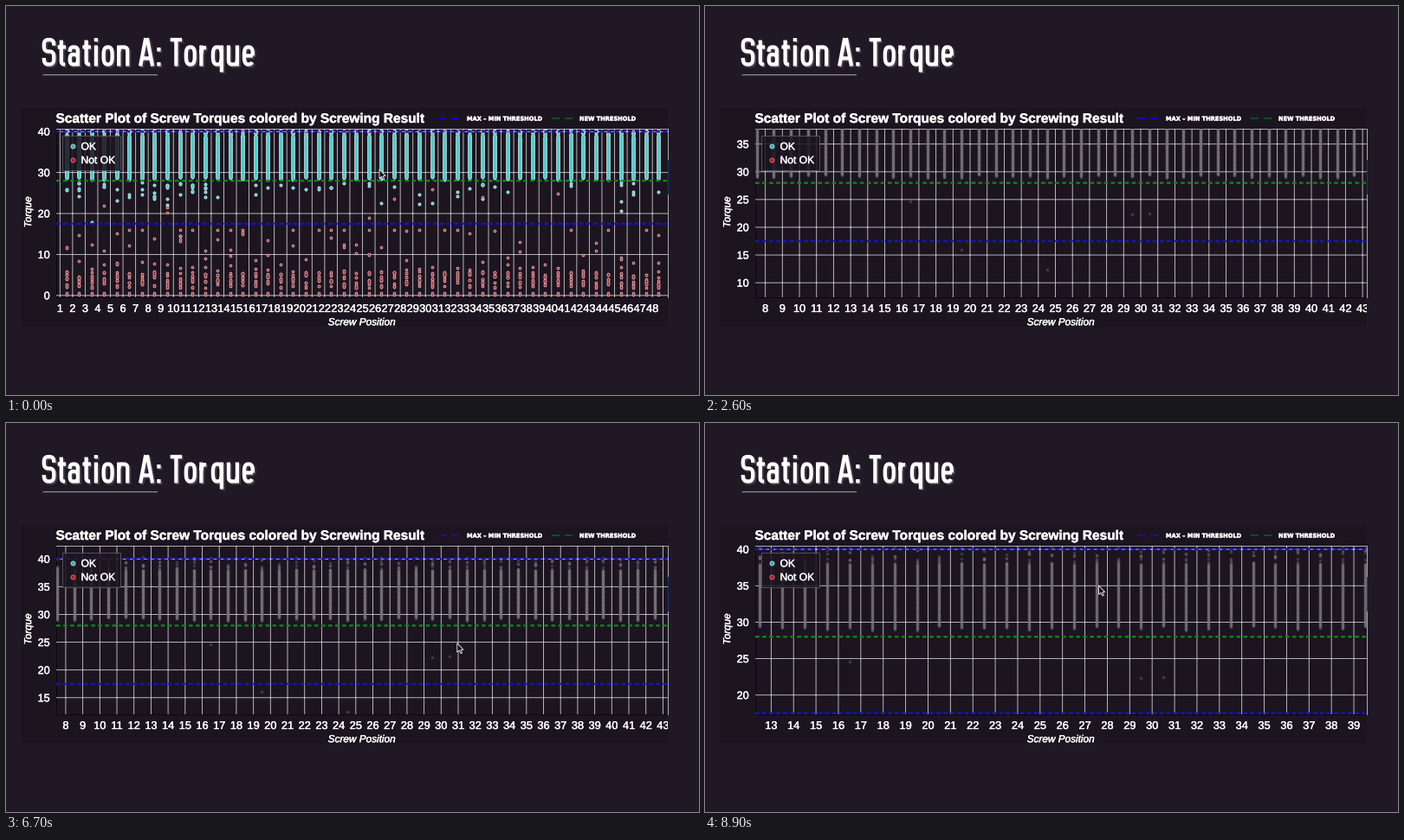
These frames come from a looping animation (800x450 px, 9000 ms). A matplotlib script:

```python
import numpy as np
import matplotlib.pyplot as plt
from matplotlib import patheffects
from matplotlib.animation import FuncAnimation
from matplotlib.patches import Polygon, Rectangle

W, H, FPS, FRAMES = 800, 450, 10, 90
PX = 0.72                                   # points per pixel at 100 dpi
LEFT, RIGHT, TOP, BOTTOM = 58, 763.5, 142, 337
BG, PANEL = "#201925", "#1c1520"
BLUE, GREEN = "#1212e0", "#0c8a12"

plt.rcParams.update({"font.family": "Liberation Sans", "text.hinting": "none"})
fig = plt.figure(figsize=(W / 100, H / 100), dpi=100, facecolor=BG)
ax = fig.add_axes([0, 0, 1, 1])
ax.set(xlim=(0, W), ylim=(H, 0))
ax.axis("off")


def box(x0, y0, x1, y1, **kw):
    return ax.add_patch(Rectangle((x0, y0), x1 - x0, y1 - y0, **kw))


def label(x, y, s, px, **kw):
    kw = {"color": "white", "va": "baseline", "zorder": 8, **kw}
    art = ax.text(x, y, s, fontsize=px * PX, **kw)
    art.set_path_effects([patheffects.withStroke(linewidth=0.25, foreground="white")])
    return art


def line(xs, ys, color, px, **kw):
    return ax.plot(xs, ys, color=color, lw=px * PX, **kw)[0]


# ---- heading in a condensed alphabet of stems, bars and arcs (baseline 0, y up)
def seg(x0, y0, x1, y1):
    return np.array([(x0, y0), (x1, y1), (np.nan, np.nan)])


def stem(x, y0=0, y1=24):
    return seg(x, y0, x, y1)


def bar(y, x0, x1):
    return seg(x0, y, x1, y)


def arc(x0, x1, y0, y1, a=0, b=360):
    """Part of a squarish oval inside the given box, from angle a to b."""
    t = np.radians(np.linspace(a, b, 60))
    c, s = (np.sign(f) * np.abs(f) ** 0.7 for f in (np.cos(t), np.sin(t)))
    xs, ys = (x0 + x1 + (x1 - x0) * c) / 2, (y0 + y1 + (y1 - y0) * s) / 2
    return np.vstack([np.column_stack([xs, ys]), (np.nan, np.nan)])


BOWL = (4, 14, 2, 22)
GLYPHS = {
    "S": (18.3, arc(3.5, 15, 17, 30.5, 0, 270), arc(3.5, 15, 2, 17, 90, -180)),
    "t": (11.8, stem(5.2, 6, 30), arc(5.2, 14, 2, 10, 180, 270), bar(22, 1, 10.5)),
    "a": (17, arc(3.3, 12.5, 11, 22, 180, 0), stem(12.5, 0, 17),
          arc(3.3, 12.5, 2, 13.5, 30, 330)),
    "i": (9.4, stem(4.7), stem(4.7, 28.3, 32.5)),
    "o": (17.6, arc(*BOWL)),
    "n": (18, stem(4), arc(4, 14, 12, 22, 180, 0), stem(14, 0, 17)),
    "A": (19.5, seg(2.7, 0, 8.9, 32.5), seg(16.7, 0, 10.5, 32.5), bar(9, 5, 14.5)),
    ":": (9, stem(4.5, 0, 4.5), stem(4.5, 17, 21.5)),
    "T": (14.7, stem(7.3, 0, 32.5), bar(30.5, 0.5, 14)),
    "r": (13.5, stem(4), arc(4, 18, 8, 21.5, 180, 95)),
    "q": (18, arc(*BOWL), stem(14, -7)),
    "u": (18, stem(4, 7), arc(4, 14, 2, 12, 180, 360), stem(14)),
    "e": (17.5, arc(*BOWL, 0, 320), bar(12, 4, 14)),
    " ": (8.2,),
}


def heading(s, x, y):
    strokes = []
    for adv, *parts in (GLYPHS[ch] for ch in s):
        strokes += [p * (1, -1) + (x, y) for p in parts]
        x += adv
    xs, ys = np.vstack(strokes).T
    for off, px, color, alpha in ((1.6, 4.8, "#8a8590", 0.35), (0, 4.3, "white", 1)):
        line(xs + off, ys + off, color, px, alpha=alpha, solid_capstyle="butt",
             solid_joinstyle="round", snap=False)


heading("Station A: Torque", 40.3, 69.5)
line([43, 174], [80, 80], "#5a545e", 2, alpha=0.5)
line([43, 174], [79, 79], "#9a959d", 0.9)

# ---- panel and fixed captions
box(17, 118, 764, 371, fc=PANEL, ec="none", zorder=0)
clip = box(LEFT, TOP - 0.5, RIGHT + 0.5, BOTTOM, fc="none", ec="none")
strip = box(17, 118, 764, 371, fc="none", ec="none")
label(57.5, 135, "Scatter Plot of Screw Torques colored by Screwing Result", 15.45,
      weight="bold")
label(410.5, 369.3, "Screw Position", 11.8, style="italic", ha="center")
label(26, 238.3, "Torque", 11.7, style="italic", ha="center", va="center", rotation=90)
for x, tx, s, c in ((499, 532, "MAX – MIN THRESHOLD", "#0d0db4"),
                    (630, 662, "NEW THRESHOLD", "#0c5214")):
    line([x, x + 9, np.nan, x + 15, x + 24], [130.3] * 5, c, 2, solid_capstyle="butt")
    label(tx, 132.6, s, 6.63, family="DejaVu Sans", weight="bold")

line([LEFT, RIGHT, RIGHT], [TOP, TOP, BOTTOM], "white", 0.9, alpha=0.7, zorder=3)
line([LEFT, LEFT, RIGHT], [TOP, BOTTOM, BOTTOM], "#0c080e", 1, zorder=1)
line([764, 764], [178, 217], "#17386e", 1, zorder=3)

box(64.5, 149.5, 132, 190, fc=PANEL, ec="#5d5762", lw=PX, alpha=0.86, zorder=7)
for y, s, fc, ec in ((162, "OK", "#3fa9a9", "#8fe6e6"), (177.8, "Not OK", "#a01c28", "#e87070")):
    ax.plot(76.7, y, "o", ms=5 * PX, mfc=fc, mec=ec, mew=0.9 * PX, zorder=8)
    label(86.5, y + 4.3, s, 12.1)

# ---- data: a dense band per screw, stray values below it, rejects near zero
rng = np.random.default_rng(7)
strays = [(16.5, 24.6), (29.5, 22.3), (30.5, 22.5)]
rejects = [(19.5, 16), (24.5, 12.4)]
ok, bad, dim = list(strays), list(rejects), strays + rejects


def add(data, c, values):
    data += [(c, v) for v in values]


for c in np.arange(1, 49) + 0.5:
    low = rng.uniform(28.2, 28.9)
    add(ok, c, np.linspace(low, 38.8, 75))
    add(ok, c, rng.uniform(38.8, 40.4, 8))
    add(ok, c, 27.6 - rng.exponential(1.8, rng.poisson(3 if c < 13 else 0.7)))
    add(bad, c, rng.uniform(39.8, 40.4, 1))
    add(bad, c, rng.uniform(1.8, 5.8, 9))
    add(bad, c, (0.1, 0.5, rng.uniform(5, 8.5)))
    add(bad, c, [16.1] * rng.binomial(1, 0.4))
    add(bad, c, rng.uniform(7.5, 15.8, rng.poisson(0.9)))
    add(bad, c, rng.uniform(18, 27, rng.poisson(0.15)))
    add(dim, c, np.linspace(low + 0.6, 38, 100))
    add(dim, c, rng.uniform(38, 40.3, 6))


def dots(data, px, color, z, alpha=1):
    art = ax.plot([], [], "o", ms=px * PX, color=color, mew=0, alpha=alpha, zorder=z)[0]
    art.set_clip_path(clip)
    return art, np.array(data).T


color_layers = [dots(ok, 3.9, "#e4fafa", 3), dots(ok, 2.5, "#45cfcf", 3.1),
                dots(bad, 3.6, "#f4bcbc", 3.2), dots(bad, 2, "#9c2430", 3.3)]
gray_layers = [dots(dim, 3.6, "#7c787d", 3, 0.36)]

# ---- moving axes
grid = line([], [], "white", 0.9, alpha=0.75, zorder=2, snap=False)
grid.set_clip_path(clip)
limits = []
for v, c in ((40, BLUE), (17.5, BLUE), (28, GREEN)):
    art = line([LEFT, RIGHT], [0, 0], c, 2.3, zorder=5, dashes=(2, 1.5),
               dash_capstyle="butt", snap=False)
    art.set_clip_path(clip)
    limits.append((art, v))
xticks = [label(0, 354, str(n), 12.8, ha="center", clip_on=True) for n in range(1, 49)]
for art in xticks:
    art.set_clip_path(strip)
yticks = [label(50.7, 0, str(v), 12.6, ha="right") for v in range(0, 45, 5)]

ARROW = np.array([(0, 0), (0, 10.5), (2.5, 8.3), (4.2, 12), (5.8, 11.3), (4.2, 7.8),
                  (7.2, 7.6)])
cursor = ax.add_patch(Polygon(ARROW, fc="#151017", ec="#e8e8e8", lw=0.9 * PX, zorder=9))


def ramp(t, a, b):
    return min(max((t - a) / (b - a), 0), 1)


def ease(t, a, b):
    u = ramp(t, a, b)
    return u * u * (3 - 2 * u)


def view(t):
    """Scale and offset of both axes: wheel zoom, drag, wheel zoom."""
    k = np.exp(0.303 * ramp(t, 0.55, 2.25))
    drag = ease(t, 5.5, 6.3)
    sx, sy = 14.55 * k, 4.74 * k
    x0 = 431.3 - 26.36 * sx - 0.7 * drag
    y0 = 195 + 29.5 * sy + 29.7 * drag
    k = np.exp(0.177 * max(t - 7.36, 0))
    return sx * k, 458 + (x0 - 458) * k, sy * k, 193 + (y0 - 193) * k


# each leg: start and end time, starting point
LEGS = [(2.3, 2.55, 431, 189), (3.2, 4.3, 775, 205), (4.6, 5.3, 556, 225),
        (5.5, 6.3, 544, 248.5), (6.5, 7.1, 544, 278), (9, 9.1, 454.5, 188)]


def pointer(t):
    pos = np.array(LEGS[0][2:], float)
    for (a, b, *p), (_, _, *q) in zip(LEGS, LEGS[1:]):
        pos += np.subtract(q, p) * ease(t, a, b)
    return pos


def update(i):
    t = i / FPS
    sx, x0, sy, y0 = view(t)
    moving = 0.55 < t < 2.85 or 5.5 <= t < 6.8 or t > 7.36

    for layers, on in ((color_layers, not moving), (gray_layers, moving)):
        for art, (xs, ys) in layers:
            art.set_visible(on)
            art.set_data(x0 + sx * xs, y0 - sy * ys)

    gx, gy = [], []
    for n, art in enumerate(xticks, 1):
        x = x0 + sx * n
        art.set_x(x)
        art.set_visible(LEFT <= x <= RIGHT)
        gx += [x, x, np.nan]
        gy += [TOP, BOTTOM, np.nan]
    step = 10 if (BOTTOM - TOP) / sy > 40 else 5
    for v, art in zip(range(0, 45, 5), yticks):
        y = y0 - sy * v
        shown = v % step == 0 and TOP <= y <= BOTTOM
        art.set_y(y + 4.5)
        art.set_visible(shown)
        if shown:
            gx += [LEFT, RIGHT, np.nan]
            gy += [y, y, np.nan]
    grid.set_data(gx, gy)

    for art, v in limits:
        y = y0 - sy * v
        art.set_ydata([y, y])
    pos = pointer(t)
    cursor.set_xy(ARROW + pos)
    cursor.set_visible(pos[0] < 758)


anim = FuncAnimation(fig, update, frames=FRAMES, interval=1000 / FPS,
                     init_func=lambda: None, repeat=True, repeat_delay=0)
plt.show()
```
